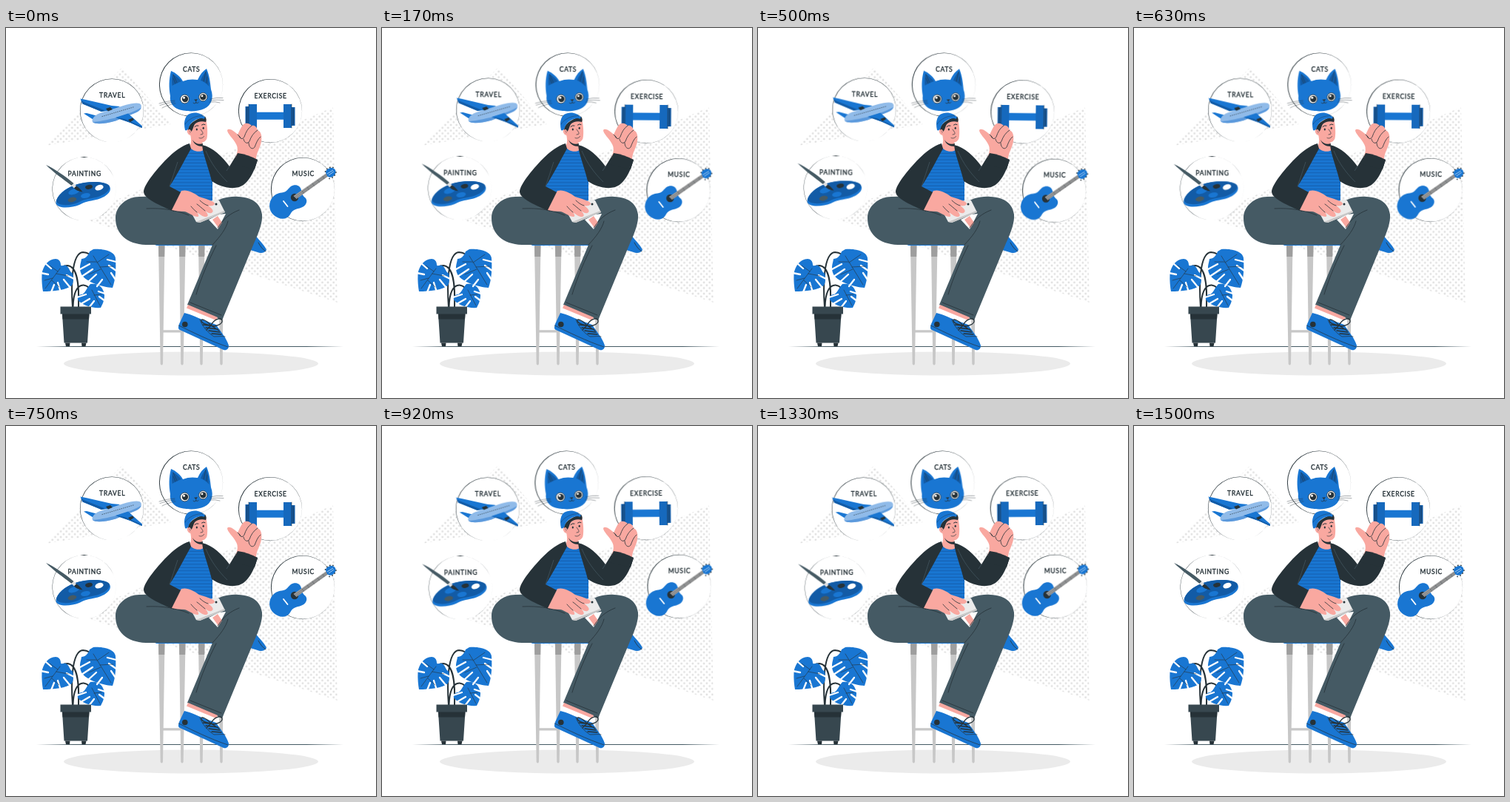
An HTML page for the animation above (1540 ms loop, 500 by 500 pixels).

```html
<!DOCTYPE html>
<html lang="en">
<head>
<meta charset="utf-8">
<title>Hobbies</title>
<style>
  html, body { margin: 0; width: 100%; height: 100%; overflow: hidden; background: #fff; }
  svg { display: block; width: 100vw; height: 100vh; }
  text { font: 400 8.5px Lato, "Open Sans", sans-serif; letter-spacing: .75px; text-anchor: middle; fill: #263238; stroke: #263238; stroke-width: .35; stroke-linejoin: round; }
  #hobbies { transform-origin: 250px 148.5px; }
  .blue { fill: #1976d2; }
  .deep { fill: #125ba6; }
  .dark { fill: #263238; }
  .slate { fill: #455a64; }
  .skin { fill: #f9a8a0; }
  .white { fill: #fff; }
  .line { fill: none; stroke: #263238; stroke-linecap: round; stroke-linejoin: round; }
  .slit { fill: none; stroke: #fff; stroke-linecap: round; }
</style>
</head>
<body>
<svg viewBox="0 0 500 500" stroke-width=".8">
  <defs>
    <pattern id="dots" width="7.6" height="7.6" patternUnits="userSpaceOnUse">
      <circle cx="1.9" cy="1.9" r="1.4" fill="#e0e0e0"/>
      <circle cx="5.7" cy="5.7" r="1.4" fill="#e0e0e0"/>
    </pattern>
    <pattern id="stripes" width="6" height="4.4" patternUnits="userSpaceOnUse">
      <path d="M0 2H6" stroke="#125099" stroke-width=".7"/>
    </pattern>
    <linearGradient id="ground">
      <stop offset="0" stop-color="#455a64" stop-opacity="0"/>
      <stop offset=".12" stop-color="#455a64"/>
      <stop offset=".88" stop-color="#455a64"/>
      <stop offset="1" stop-color="#455a64" stop-opacity="0"/>
    </linearGradient>
  </defs>

  <path fill="url(#dots)" d="M157 53L223 130L54 159ZM442 107L448 371L96 255Z"/>
  <rect x="41" y="430" width="415" height="1" fill="url(#ground)"/>
  <ellipse cx="250" cy="453.5" rx="172" ry="16" fill="#ebebeb"/>

  <g id="hobbies">
    <g id="rings"></g>

    <g id="cat">
      <path class="blue" d="M222 92C220 81 220 69 223 58C230 61 236 66 239 72C246 69 253 69 259 70C262 63 266 58 271 55C275 64 276 74 277 83C281 94 278 104 268 109C258 114 240 113 231 109C224 105 221 99 222 92Z"/>
      <path class="deep" d="M224.500 78C224 72 224 66 225 62C230 65 234 68 237 72C232 74 228 76 224.500 78ZM263 71C265 65 268 61 270.500 58C273 65 274 72 274.500 79C271 75 267 72 263 71Z"/>
      <path class="line" d="M226 63L231 74M226 68L229 75M270 59L267 72M272 66L271 74" stroke-width=".5"/>
      <circle class="white" cx="241.500" cy="96" r="5.900" stroke="#263238"/>
      <circle class="white" cx="266.300" cy="93.200" r="5.600" stroke="#263238"/>
      <g class="dark"><circle cx="242" cy="96" r="4.200"/><circle cx="266.300" cy="93.300" r="4.100"/><path d="M254 96.700L259 96.200L256.800 99Z"/></g>
      <g class="white"><circle cx="240.500" cy="94.300" r="1.500"/><circle cx="265" cy="91.800" r="1.400"/></g>
      <path class="line" stroke-width=".7" d="M256.800 99V101Q254.500 103 253 101.300M256.800 101Q259 102.500 260.300 100.500"/>
      <path class="line" stroke-width=".4" d="M228 100Q217 101 208 104.500M229 102Q218 104 211 108M228 98Q218 98.500 207 102M276 96Q285 93.500 293 94.500M276 98Q285 96.500 294 97.500M275 100Q283 99 289 101"/>
    </g>

    <g id="plane">
      <path class="blue" d="M100.500 95.500L108 97L143 105L154 106L146 111L129 113L103.500 102.500ZM105 115.500L109 115L126 119.500L119 124.500Z"/>
      <path class="deep" d="M101 97.500L103.500 102.500L129 113L134 111.500L106 100.500Z"/>
      <path fill="#90bbe9" d="M182.500 104C181 100 172 101 160 104.500L127 115C119 118 115 124 117 127C121 131 136 129 148 125.500L174 115C181 112 184 108 182.500 104Z"/>
      <path fill="#5b99dc" d="M117 127C121 131 136 129 148 125.500L174 115C179 113 182 110.500 182.700 107.500C170 115 142 125 117 127Z"/>
      <path class="blue" d="M148 121L165 115.500L184 132.500L183.500 135L168 128Z"/>
      <path class="deep" d="M148 121L168 128L183.500 135L184 133.500L161 123Z"/>
      <path class="dark" d="M135 109L141 107L144 110L138 112.500ZM165 124L171 121.500L173 124L168 127Z"/>
      <path class="line" stroke-width=".7" stroke-dasharray=".7 2" d="M130 119.500L172 107"/>
    </g>

    <g id="dumbbell">
      <path class="blue" d="M337 113.800H377V123.800H337Z"/>
      <path fill="#1669bd" d="M328 103H339V135H328ZM375 103H386V135H375Z"/>
      <path class="deep" d="M323.500 106H328V133H323.500ZM386 107H390.500V132H386Z"/>
      <path class="line" stroke-width=".6" d="M328 103V135M386 103V135M325.500 108V131M388.300 109V130"/>
    </g>

    <g id="guitar">
      <path class="blue" d="M360 229C355 235 354 246 362 253C370 260 380 259 384 252C387 246 391 245 397 243.500C406 241 408 234 405 230C400 226 400 223 399 219C398 213 391 210 385 214C381 217 380 221 375 222C369 223 364 224 360 229Z"/>
      <circle class="dark" cx="390" cy="229" r="5.200"/>
      <path fill="#9e9e9e" d="M388.500 227L433 196L436 200L392.500 231Z"/>
      <path class="line" stroke-width=".3" d="M390 228.500L434 197.500M391.500 230L435 199M400 220L402.500 223.500M407 215L409.500 218.500M414 210L416.500 213.500M421 205.500L423.500 208.500M428 200.500L430 203.500"/>
      <path class="blue" d="M432 195C432 191 437 188.500 441 189C445 190 447 194 444.500 198C442 202 437 203 434 200Z"/>
      <path class="line" stroke-width="1.700" stroke-dasharray=".1 4.200" d="M431.500 194C433 189.500 437.500 187.500 442 188.500M437 203.500C441 203 445 199.500 446 195"/>
      <path d="M434 197L442 192M436 199L443 194" stroke="#fff" stroke-width=".6"/>
      <path d="M375 234L380.500 241" stroke="#fff" stroke-width="1.800" stroke-linecap="round"/>
    </g>

    <g id="palette">
      <path class="blue" d="M67.500 237C67 231 74 220 91 213C110 206 136 206 140.500 215C143 222 134 229 122 232C112 234 106 235 99 239C89 243 70 245 67.500 237Z"/>
      <path class="deep" d="M68 234C69 227 78 218 92 212.500C109 206.500 134 206.500 139.500 213C142 219 133 226 121 229C110 231 104 232 97 236C88 240 70 241 68 234Z"/>
      <ellipse class="blue" cx="92" cy="221" rx="8" ry="3.800" transform="rotate(-18 92 221)"/>
      <ellipse class="white" cx="126" cy="215.700" rx="5.800" ry="3.600" transform="rotate(-18 126 215.700)"/>
      <ellipse class="dark" cx="112" cy="214.800" rx="5" ry="2.900" transform="rotate(-12 112 214.800)"/>
      <ellipse class="slate" cx="89.500" cy="232" rx="6" ry="3.200" transform="rotate(-12 89.500 232)"/>
      <ellipse class="blue" cx="107.500" cy="226.500" rx="6.500" ry="3.400" transform="rotate(-12 107.500 226.500)"/>
      <path class="slate" d="M54 185C65 190 80 200 91.500 210L88.500 213C77 204 64 195 54 185Z"/>
      <path fill="#e0e0e0" d="M91.500 210L95 213.500L92 216.500L88.500 213Z"/>
      <path class="dark" d="M95 213.500C99 215.500 101 218.500 103.500 221.500C98 221 94 219 92 216.500Z"/>
    </g>
  </g>

  <g id="plant">
    <path class="line" stroke-width="2" d="M90 377C88 350 88 304 104 303C111 303 116 307 120 314M98 377C99 348 97 322 83 321C77 321 73 324 70 329M90.500 377C91 358 96 347 105 347.500C111 348 114 353 117 358"/>
    <g class="blue">
      <path d="M118 299C129 298 147 301 148 311C149 326 148 340 144 351C130 350 109 344 102 333C98 324 101 319 102 312C107 312 111 308 113 302Z"/>
      <path d="M67 312C57 312 50 322 48.500 332C48 342 49 350 50 356C64 356 82 354 89 348C92 343 91 336 90 331C86 331 86 323 81 321C77 320 75 323 74 320C74 315 71 312 67 312Z"/>
      <path d="M114 346C125 344 132 351 133 361C133 369 130 374 128 378C116 379 101 374 97 367C96 362 99 360 103 360C108 357 109 351 114 346Z"/>
    </g>
    <path class="slit" stroke-width="2.300" d="M100 326L113 319M102 336L117 326M111 343L122 333M123 349L130 340M149 316L137 313M149 328L139 321M148 340L142 331M53 318L61 325M47 331L57 333M61 357L65 347M74 357L70 344M87 351L78 340M92 339L82 334M96 364L108 360M101 373L113 366M112 378L119 369M134 359L125 356M134 369L126 363"/>
    <path class="line" stroke-width=".6" d="M118 308L142 347M123 317L139 306M127 323L145 322M122 316L109 316M128 326L112 333M73 325L53 352M70 329L59 321M63 338L52 341M68 332L84 335M62 341L72 350M116 354L127 375M119 361L129 360"/>
    <path fill="#37474f" d="M73.500 376.500H115V386.500H73.500ZM76 386.500H112.500L110 425.500H78.500Z"/>
    <path class="dark" d="M76 386.500H112.500L112 393.500H76.500ZM80 425.500H86.500L86 430.300H81ZM102 425.500H108.500L107.500 430.300H102.500Z"/>
  </g>

  <g id="stool">
    <path fill="#c7c7c7" d="M206 293H214.500L212 454Q210.400 457 208.700 454ZM234 293H242.500L239.700 454Q238 457 236.300 454ZM260 293H268.500L265.700 454Q264 457 262.300 454ZM286 293H294L292.700 454Q291 457 289.300 454ZM211 408.300H240V411.500H211Z"/>
    <path fill="#9e9e9e" d="M206 293H214.500L214.200 309H206.300ZM234 293H242.500L242.200 309H234.300ZM260 293H268.500L268.200 309H260.300Z"/>
    <path class="blue" d="M201 289H286V294H204Q201 294 201 291Z"/>
  </g>

  <g id="person">
    <path class="blue" d="M337 280C343 288 350 294 352 300C350 304 344 305 340 303L330 300Z"/>
    <path class="line" d="M341 290Q345 298 351 302"/>

    <path class="blue" d="M248 160L267 163L279 200V238L240 233L219 214Z"/>
    <path fill="url(#stripes)" d="M248 160L267 163L279 200V238L240 233L219 214Z"/>

    <path class="skin" d="M249 144C251 152 250 157 248 160C251 166 260 169 267 165L265 153Z"/>
    <path class="dark" d="M252 151C255 156 261 158 266 156L265.500 160C259 160 254 157 252 151Z"/>
    <path class="skin" d="M249 131L270 122C272 131 273 142 271.500 149C270 154 265 155.500 260 154.500C255 153 251 149 250 145C246 145 243.500 140 245.500 136.500C246.500 135 248 135 249 136Z"/>
    <path class="dark" d="M246 138C246 131 253 124 269 119.500C271 122 271 125 270 127C264 125 258 127 255 130C253 133 253 137 250.500 140C249 137 248 136 246 138Z"/>
    <path class="blue" d="M242 138C240 130 241 121 246 117C253 112.500 264 114 269 121C268 123 267 123 265 122C257 122 248 128 246.500 136C245 138 243.500 139 242 138Z"/>
    <path class="line" stroke-width=".4" d="M242 130C246 123 257 118 267 118.500M247.500 139C249.500 139.500 249.500 141 248.500 142"/>
    <g class="dark"><ellipse cx="257.800" cy="137" rx="1.100" ry="1.500"/><ellipse cx="266.700" cy="135.300" rx="1.100" ry="1.500"/></g>
    <path class="line" stroke-width="1" d="M255 133.500Q257 131 260 132M264.500 131Q267 129 269 130.500"/>
    <path class="line" stroke-width=".7" d="M263 137C265 140 267 142 265.500 143.500L263 144M261 148.500C263 149.500 266 149 267.500 146.500"/>

    <path class="dark" d="M265 158C279 161 293 174 302 187L313 169L340 178C335 196 327 211 315 215C304 218 290 215 278 207C275 194 269 178 266 165Z"/>
    <path d="M270 166C277 183 287 196 299 208M302 187L298 193" fill="none" stroke="#455a64" stroke-width=".7"/>

    <path class="slate" d="M180 228C164 228 148 240 148 257C148 278 163 292 189 293H279L245 374L292 395L335 291C342 276 347 262 346 252C344 237 333 229 314 228C300 227 288 231 278 237C258 230 215 226 180 228Z"/>
    <path class="white" d="M274 259L288 252L297 251L286 272Z"/>
    <path class="skin" d="M279 259L286 254L292 263L287 270Z"/>
    <path class="line" d="M190 244C212 243 230 246 247 253M286 270C294 258 302 251 315 246M279 293C290 281 297 272 300 261M249 371L291 388M257 360C264 336 275 312 284 294"/>

    <path class="dark" d="M248 156C238 159 228 166 215 179C202 193 187 211 186 221C186 231 209 240 227 248L238 223L221 214C231 199 241 179 250 163Z"/>
    <path d="M232 181C228 193 225 203 221 214" fill="none" stroke="#455a64" stroke-width=".7"/>

    <path fill="#ebebeb" d="M249 247L283 231L288 233L296 249L262 263L257 262Z"/>
    <path d="M257 262L262 263L296 249L295 247Z" fill="#c7c7c7"/>
    <circle class="dark" cx="284" cy="238" r="1.500"/>
    <path class="skin" d="M237 220C245 218 253 222 261 228C269 231 280 233 282 237C282 240 277 241 273 240C278 243 281 247 279 249C276 252 272 249 269 247C273 251 274 254 271 255C267 256 262 252 258 249C261 253 261 255 258 255C251 254 247 249 241 248C235 248 229 247 224 246Z"/>
    <path class="line" d="M273 240C269 239 265 236 262 233M269 247C264 243 261 240 258 238M258 249C254 246 252 243 250 241"/>

    <path class="skin" d="M310 176C313 168 314 162 311 157C307 149 299 143 299 138C301 135 307 138 313 144C316 139 318 131 323 129C327 128 330 130 332 132C336 131 339 134 340 138C345 140 346 146 345 153C344 162 338 168 338 178Z"/>
    <path class="line" d="M332 132C327 135 324 141 322 147C320 151 316 150 315 146M340 138C335 141 331 147 329 153C327 157 322 156 321 150M344 147C340 150 338 156 336 161C333 165 328 162 328 155M313 144L317 148"/>
    <path class="dark" d="M313 169Q327 171 340 178L336 191L306 184Z"/>

    <path class="white" d="M245 376L286 393L283 404L241 388Z"/>
    <path class="skin" d="M246 374L286 391L284 395L244 378.500Z"/>
    <path class="blue" d="M241 385C251 387 259 392 265 394L284 401C290 410 298 419 301 429C301 434 298 436 294 435L235 408C232 407 233 403 234 400Z"/>
    <path class="line" stroke-width=".7" d="M233.500 402C252 411 276 423 300 431M262 394C265 403 273 412 281 417C288 417 293 416 296 417"/>
    <circle class="dark" cx="241.800" cy="400.500" r="3.800"/>
    <path class="line" stroke-width="1.300" d="M266 401L283 403M270 405L286 407M274 409L289 411M278 413L291 414M277 402C270 394 263 392 264 396C265 400 272 401 277 402C281 393 290 391 292 395C293 400 284 404 277 402M277 402L271 408M277 402L288 409"/>
  </g>
</svg>
<script>
  const rings = document.getElementById('rings');
  const disc = (x, y, r) => `M${x - r} ${y}a${r} ${r} 0 1 0 ${2 * r} 0a${r} ${r} 0 1 0 ${-2 * r} 0Z`;

  // label, centre x, centre y, baseline, direction of the heavy side in degrees, its weight
  const bubbles = [
    ['TRAVEL', 143, 111.5, 94, -120, .8],
    ['CATS', 250, 76.5, 59, 190, 1],
    ['EXERCISE', 357, 112, 94.5, 205, 1],
    ['MUSIC', 401, 218, 200, 200, 1],
    ['PAINTING', 105.5, 217.5, 200, 180, .4],
  ];
  rings.innerHTML = bubbles.map(([label, x, y, base, dir, weight]) => {
    const a = dir * Math.PI / 180, shift = weight * .45;
    const inner = disc(x - shift * Math.cos(a), y - shift * Math.sin(a), 43.1 - weight / 2);
    return `<circle class="white" cx="${x}" cy="${y}" r="43"/>
      <path class="dark" fill-rule="evenodd" d="${disc(x, y, 43.1)}${inner}"/>
      <text x="${x + .7}" y="${base}">${label}</text>`;
  }).join('');

  // Triangle-wave sway of one degree, drawn at 24 frames a second.
  const loop = 1540, period = 1500, fps = 24, count = 37;
  const sway = t => {
    const p = t / period % 1;
    return p < .25 ? 4 * p : p < .75 ? 2 - 4 * p : 4 * p - 4;
  };
  const steps = Array.from({ length: count }, (_, i) => {
    const t = i * 1000 / fps;
    return {
      offset: Math.round(t / 10) * 10 / loop,
      transform: `rotate(${sway(t)}deg)`,
      easing: 'step-end',
    };
  });
  steps.push({ offset: 1, transform: 'rotate(0deg)' });
  document.getElementById('hobbies').animate(steps, { duration: loop, iterations: Infinity });
</script>
</body>
</html>
```
